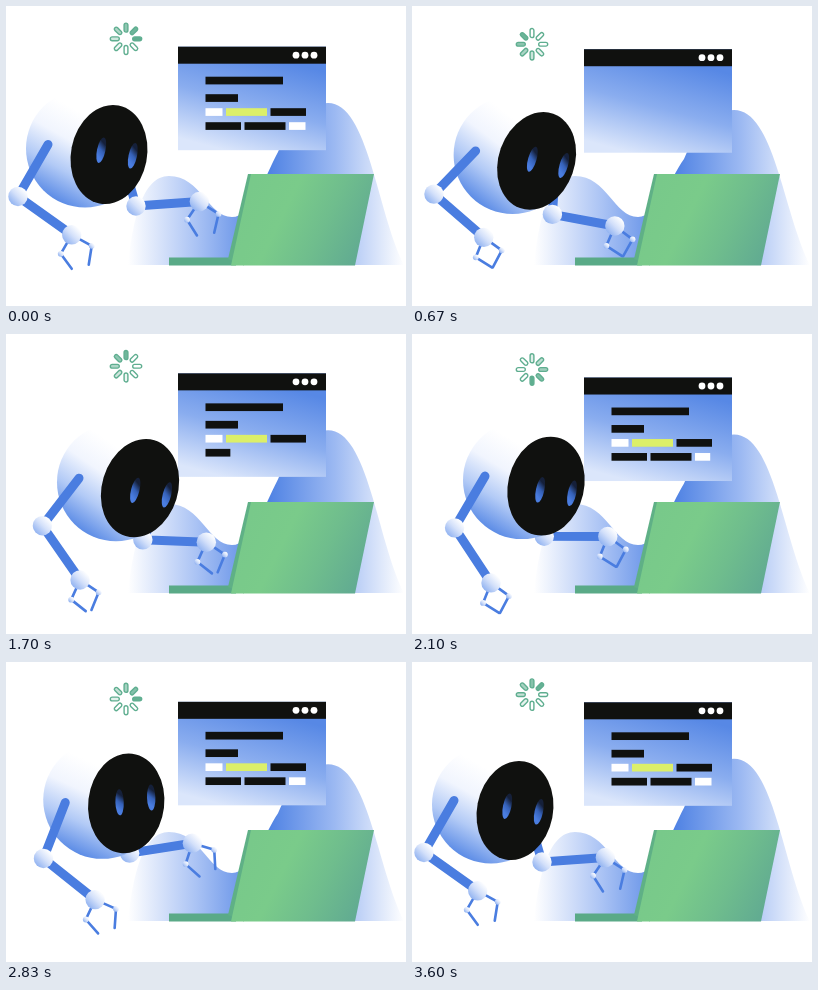
Animation, 400 px wide and 300 px high, one loop 3730 ms. Source, as an HTML page with a canvas:

```html
<!DOCTYPE html>
<html lang="en">
<head>
<meta charset="utf-8">
<title>Robot at work</title>
<style>
html, body { margin: 0; width: 100%; height: 100%; overflow: hidden; background: #fff; }
canvas { display: block; width: 400px; height: 300px; }
</style>
</head>
<body>
<canvas id="stage" width="400" height="300"></canvas>
<script>
const ctx = document.getElementById('stage').getContext('2d');
const LOOP = 3730, LAST = 3600, CYCLE = 3633, TAU = Math.PI * 2;
const INK = '#10110f', ARM = '#4a7de0', GREEN = '#5fae90', YELLOW = '#dcef69';

const rad = deg => deg * Math.PI / 180;
const clamp = v => Math.max(0, Math.min(1, v));
const polar = ([x, y], length, deg) => [x + length * Math.cos(rad(deg)), y + length * Math.sin(rad(deg))];
const wave = (t, shift) => Math.sin(TAU * (2 * t / CYCLE - shift));
function ease(t, from, to) {
  const u = clamp((t - from) / (to - from));
  return u * u * (3 - 2 * u);
}

// The robot leans in to type, sags slowly, rears back and returns to rest.
function poseAt(t) {
  const raise = ease(t, 2600, 3050);
  const rear = raise * (1 - ease(t, 3050, 3600));
  const lean = ease(t, 0, 1050) * (1 - raise);
  const nod = ease(t, 0, 600) * (1 - ease(t, 1250, 2200));
  const sag = ease(t, 0, 2000) * (1 - raise);
  const grip = ease(t, 0, 600) * (1 - ease(t, 2100, 2500));
  const open = 1 - grip * (.75 + .25 * Math.cos(TAU * (t - 670) / 1430));

  const face = [103 + 31 * lean - 2 * rear, 148.5 + 3.5 * lean + 4 * nod - 22 * rear];
  const tilt = 11 + 2 * lean + 7 * nod - 13 * rear;
  const body = [face[0] - 24, face[1] - 6 + 6 * rear];
  const shoulder = [body[0] - 37, body[1] - 4 + 16 * rear];
  const elbow = polar(shoulder, 60, 120 + 14 * nod - 21 * rear);
  const wrist = polar(elbow, 66, 35.5 + 21 * sag - 22 * rear);
  const backElbow = [130 + 2 * lean + 9 * nod - 18 * rear, 200 + 2 * lean + 7 * nod - 24 * rear];
  const backWrist = polar(backElbow, 63.5, -4 - 5 * lean + 9 * (1 - open) + 9 * nod - 5 * rear);

  return {
    face, tilt, body, open,
    eyes: [face[0] + 8 + 2 * lean + 2 * nod, face[1] - 1.5 + 7 * lean - 2 * nod - 14.5 * rear],
    eyeLine: 10 - 4 * lean + 4 * nod - 39 * rear,
    eyeTilt: 12 + 4 * nod - 33 * rear,
    front: [shoulder, elbow, wrist], frontTurn: -12 * rear,
    back: [[face[0] + 18, face[1] + 20], backElbow, backWrist], backTurn: 4 - 4 * lean - 33 * rear
  };
}

function gradient(x1, y1, x2, y2, ...colors) {
  const g = ctx.createLinearGradient(x1, y1, x2, y2);
  colors.forEach((color, i) => g.addColorStop(i / (colors.length - 1), color));
  return g;
}
function rect(x, y, w, h, fill) {
  ctx.fillStyle = fill;
  ctx.fillRect(x, y, w, h);
}
function oval(x, y, rx, ry, turn, fill) {
  ctx.fillStyle = fill;
  ctx.beginPath();
  ctx.ellipse(x, y, rx, ry, turn, 0, TAU);
  ctx.fill();
}
function polygon(fill, ...points) {
  ctx.fillStyle = fill;
  ctx.beginPath();
  points.forEach(p => ctx.lineTo(...p));
  ctx.fill();
}
function limb(width, ...points) {
  ctx.strokeStyle = ARM;
  ctx.lineWidth = width;
  ctx.lineCap = ctx.lineJoin = 'round';
  ctx.beginPath();
  points.forEach(p => ctx.lineTo(...p));
  ctx.stroke();
}
function joint([x, y], r) {
  oval(x, y, r, r, 0, gradient(x + r * .7, y - r * .7, x - r * .7, y + r * .7, '#ffffff', '#d3e0fa', '#93b4f1'));
}

function drawHills(t) {
  const top = 99 + 4 * wave(t, .14);
  ctx.fillStyle = gradient(122, 0, 398, 0, '#ffffff', '#a9c2f4', '#4c80e3', '#9cb9f2', '#ffffff');
  ctx.beginPath();
  ctx.moveTo(122, 259);
  ctx.bezierCurveTo(127, 215, 136, 170, 163, 170);
  ctx.bezierCurveTo(195, 170, 202, 211, 226, 211);
  ctx.bezierCurveTo(246, 211, 258, 172, 272, top + 50);
  ctx.bezierCurveTo(287, top + 15, 304, top + 1, 322, top + 1);
  ctx.bezierCurveTo(362, top + 1, 371, 205, 398, 259);
  ctx.fill();
}

function drawSpinner(t) {
  const lead = t / CYCLE * 32;
  ctx.save();
  ctx.translate(120, 35.2 + 3.1 * wave(t, .14));
  ctx.lineWidth = 1.4;
  ctx.strokeStyle = GREEN;
  ctx.fillStyle = GREEN;
  for (let i = 0; i < 8; i++) {
    ctx.beginPath();
    ctx.roundRect(-1.9, -15.7, 3.8, 9, 1.9);
    ctx.globalAlpha = clamp(1.1 - ((lead - i + 10) % 8) / 5);
    ctx.fill();
    ctx.globalAlpha = 1;
    ctx.stroke();
    ctx.rotate(TAU / 8);
  }
  ctx.restore();
}

// Each row: offset from the window top, then colour and width of each word
const rows = [
  [30, [INK, 77.5]],
  [47.5, [INK, 32.5]],
  [61.5, ['#fff', 17], [YELLOW, 41], [INK, 35.5]],
  [75.5, [INK, 35.5], [INK, 41], ['#fff', 16.5]]
];
function drawWindow(t) {
  const y = 40.7 + 3.4 * wave(t, 0);
  rect(172, y, 148, 103.5, gradient(262, y + 10, 236, y + 108, '#5788e5', '#8aadef', '#dbe6fb'));
  rect(172, y, 148, 17, INK);
  for (let i = 0; i < 3; i++) oval(290 + i * 9, y + 8.5, 3.4, 3.4, 0, '#fff');
  let words = t < 660 ? 8 * (1 - clamp((t - 130) / 500)) : (t - 674) / 180;
  for (const [dy, ...parts] of rows) {
    let x = 199.5;
    for (const [color, width] of parts) {
      rect(x, y + dy, width * clamp(words--), 7.7, color);
      x += width + 3.5;
    }
  }
}

function drawLaptop() {
  rect(163, 251.5, 67, 8, '#5aaa87');
  polygon('#5fb086', [242, 168], [248, 168], [238, 259.5], [222, 253]);
  polygon(gradient(240, 190, 352, 245, '#78c98a', '#7acb8a', '#6fbd8d', '#62ac91'),
    [245, 168], [368, 168], [349, 259.5], [225, 259.5]);
}

function drawArm([shoulder, elbow, wrist], open, turn) {
  limb(9, shoulder, elbow, wrist);
  const place = (x, y) => polar(wrist, Math.hypot(x, y), Math.atan2(y, x) * 360 / TAU + turn);
  const fingers = [
    [place(-8 - 3 * open, 20 - open), place(8 - 8 * open, 30 + 4 * open)],
    [place(18 + 2 * open, 13 - 2 * open), place(9 + 8 * open, 30)]
  ];
  for (const [knuckle, tip] of fingers) {
    limb(2.6, wrist, knuckle, tip);
    joint(knuckle, 2.9);
  }
  joint(wrist, 9.7);
  joint(elbow, 9.7);
}

function drawHead({ face, tilt, body, eyes, eyeLine, eyeTilt }) {
  const [light, shade] = [-59, 59].map(r => polar(body, r, tilt + 108));
  oval(...body, 59, 59, 0, gradient(...light, ...shade, '#ffffff', '#ffffff', '#f1f5fe', '#b2caf6', '#5c8ce6'));
  oval(...face, 38, 50, rad(tilt), INK);
  for (const side of [-16, 16]) {
    ctx.save();
    ctx.translate(...polar(eyes, side, eyeLine));
    ctx.rotate(rad(eyeTilt));
    oval(0, 0, 4.2, 13, 0, gradient(-4, 5, 4, -5, '#4a7de0', '#3561b8', '#15203a'));
    ctx.restore();
  }
}

function draw(now) {
  const step = Math.floor((now % LOOP) * .03 + .01);
  const t = Math.min(LAST, step / .03);
  const pose = poseAt(t);
  rect(0, 0, 400, 300, '#fff');
  drawHills(t);
  drawSpinner(t);
  drawWindow(t);
  drawArm(pose.back, pose.open, pose.backTurn);
  drawLaptop();
  drawHead(pose);
  drawArm(pose.front, pose.open, pose.frontTurn);
}

const start = performance.now();
function tick() {
  draw(performance.now() - start);
  requestAnimationFrame(tick);
}
tick();
</script>
</body>
</html>
```
